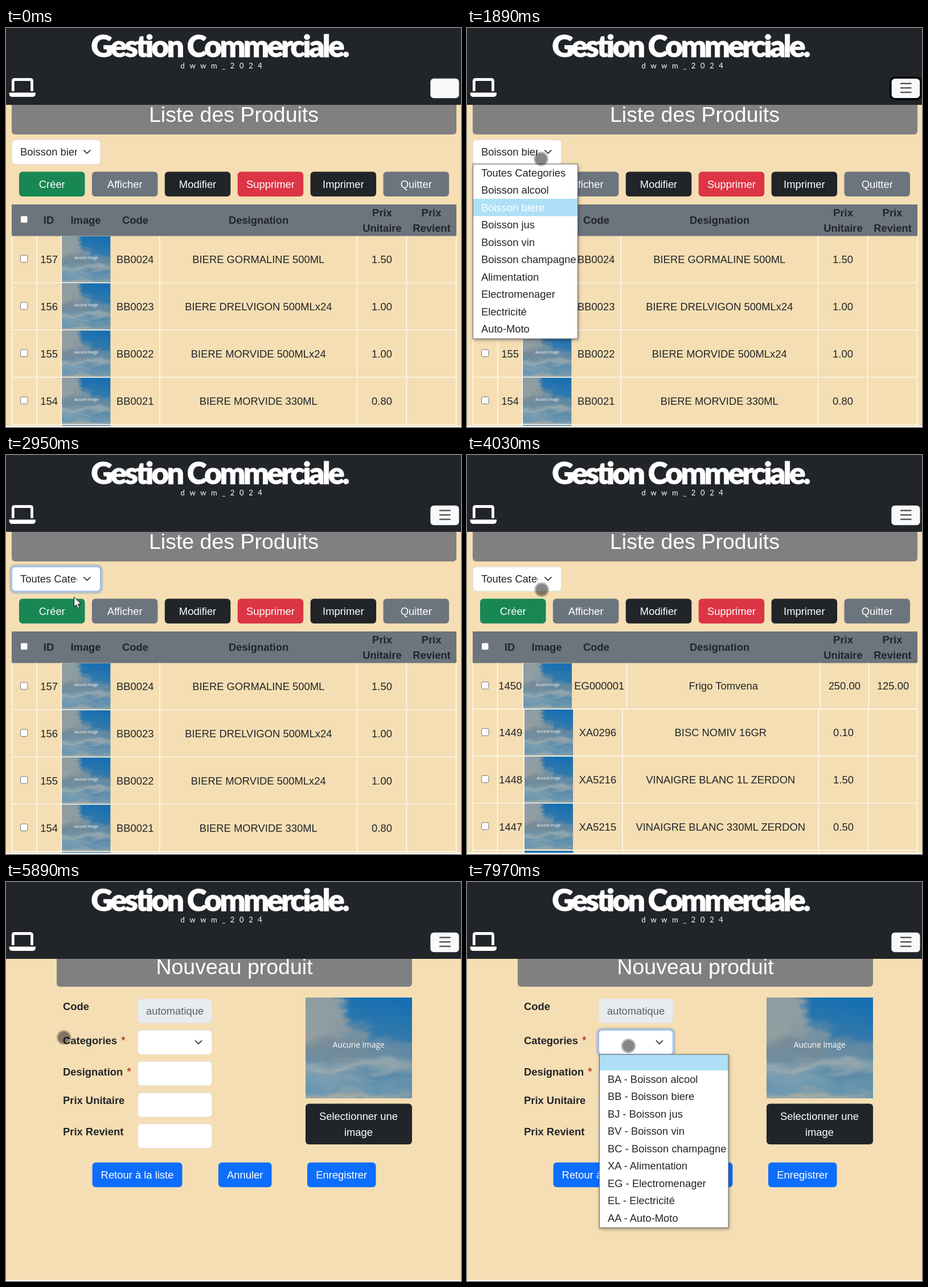
These frames come from a looping animation (799x701 px, 8 s). An HTML page:

```html
<!DOCTYPE html>
<html lang="fr">
<head>
<meta charset="utf-8">
<title>Gestion Commerciale</title>
<style>
  html, body { margin: 0; width: 100%; height: 100%; overflow: hidden; background: #fff; }
  svg { display: block; width: 100vw; height: 100vh; }
  text { font: 18.4px "Liberation Sans", Arial, sans-serif; fill: #212529; white-space: pre; }
  .mid { text-anchor: middle; }
  .bold { font-weight: 700; }
  .white { fill: #fff; }
  .title { font-size: 37.5px; fill: #fff; }
  .brand { font: 900 53px Lato, "Open Sans", sans-serif; letter-spacing: -3.65px; fill: #fff; stroke: #fff; stroke-width: .8; }
  .sub { font: 13px Lato, sans-serif; letter-spacing: 8.6px; fill: #fff; }
  .sky { font: 13.7px "Open Sans", "Noto Sans", sans-serif; fill: #fff; }
  .star { font-size: 20px; fill: #a31515; }
  .muted { fill: #5c6166; }
  .line { stroke: #fff; stroke-width: 1.2; }
  .menu { filter: drop-shadow(1px 2px 3px rgba(0,0,0,.4)); }
</style>
</head>
<body>
<svg id="stage" viewBox="0 0 799 701" preserveAspectRatio="none"></svg>
<script>
const LOOP = 8000;
const DARK = '#212529', GREY = '#6c757d', BLUE = '#0d6efd';

const rect = (x, y, w, h, fill, r = 0, extra = '') =>
  `<rect x="${x}" y="${y}" width="${w}" height="${h}" rx="${r}" fill="${fill}" ${extra}/>`;
const text = (x, y, s, cls = '') => `<text x="${x}" y="${y}" class="${cls}">${s}</text>`;
const hline = (x1, x2, y) => `<path class="line" d="M${x1} ${y}H${x2}"/>`;
const vline = (x, y1, y2) => `<path class="line" d="M${x} ${y1}V${y2}"/>`;
const blob = (x, y, rx, ry, fill, o = 1) =>
  `<ellipse cx="${x}" cy="${y}" rx="${rx}" ry="${ry}" fill="${fill}" opacity="${o}"/>`;
const sky = (x, y, w, h) =>
  `<use href="#sky" transform="translate(${x} ${y}) scale(${w / 188} ${h / 177})"/>`;
const button = (x, y, w, label, fill) =>
  rect(x, y, w, 43.4, fill, 6) + text(x + w / 2, y + 28.4, label, 'mid white');
const field = (x, y, w, fill = '#fff') =>
  rect(x, y, w, 42.4, fill, 6, 'stroke="#dee2e6"');
const chevron = (x, y) =>
  `<path d="M${x - 5.5} ${y - 2.7}l5.5 5.5l5.5 -5.5" fill="none" stroke="#343a40" stroke-width="1.9" stroke-linecap="round" stroke-linejoin="round"/>`;
const ring = (id, x, y, w) =>
  `<g id="${id}">${rect(x - 2.5, y - 2.5, w + 5, 47.4, 'none', 8, 'stroke="#0d6efd" stroke-opacity=".25" stroke-width="4.6"')}
   ${rect(x, y, w, 42.4, 'none', 6, 'stroke="#86b7fe"')}</g>`;
const checkbox = y => rect(25.5, y - 6, 12.5, 12.5, '#fff', 2.5, 'stroke="#767676"');

const defs = `<defs>
  <linearGradient id="air" x1=".65" y1="0" x2=".45" y2="1">
    <stop offset="0" stop-color="#176fb2"/><stop offset=".35" stop-color="#3279ab"/>
    <stop offset=".6" stop-color="#6790a8"/><stop offset="1" stop-color="#5f93b3"/>
  </linearGradient>
  <filter id="cloud" x="-30%" y="-30%" width="160%" height="160%">
    <feGaussianBlur stdDeviation="6" result="soft"/>
    <feTurbulence type="fractalNoise" baseFrequency=".018 .045" numOctaves="3" seed="4" result="noise"/>
    <feDisplacementMap in="soft" in2="noise" scale="34" xChannelSelector="R" yChannelSelector="G"/>
  </filter>
  <clipPath id="frame"><rect width="188" height="177"/></clipPath>
  <clipPath id="pick"><rect x="11" y="197" width="113.5" height="42"/></clipPath>
  <g id="sky" clip-path="url(#frame)">
    <rect width="188" height="177" fill="url(#air)"/>
    <g filter="url(#cloud)">
      ${blob(15, 40, 58, 58, '#a2a5a0', .85)}${blob(75, 62, 42, 22, '#8798a0', .75)}
      ${blob(40, 92, 75, 20, '#748a98', .85)}${blob(150, 92, 50, 14, '#6f8da1', .75)}
      ${blob(125, 118, 72, 9, '#a6afaf', .8)}${blob(25, 126, 55, 8, '#aeb5b2', .8)}
      ${blob(145, 138, 55, 6, '#4e86aa', .8)}${blob(50, 146, 60, 6, '#8ea6b2', .8)}
      ${blob(70, 172, 110, 9, '#b4b1a3', .85)}
    </g>
  </g>
</defs>`;

function row(top, bottom, cols, cells) {
  const [id, code, name, price, cost = ''] = cells;
  const [a, b, c, d, e] = cols;
  const mid = (top + bottom) / 2, base = mid + 6.8;
  const imgW = 85.5;
  return sky(b + .8, top + .8, imgW, bottom - top - 1.6)
    + `<text x="${b + 43.5}" y="${mid}" class="sky mid" style="font-size:6.3px">Aucune Image</text>`
    + checkbox(mid - 1)
    + text((a + b) / 2, base, id, 'mid') + text((b + imgW + c) / 2 + .3, base, code, 'mid')
    + text((c + d) / 2, base, name, 'mid') + text((d + e) / 2, base, price, 'mid')
    + text((e + 790.5) / 2, base, cost, 'mid')
    + [10.5, ...cols, 790.5].map(x => vline(x, top, bottom)).join('')
    + hline(10, 791, bottom);
}

function table(first, pitch, firstCols, cols, rows) {
  const last = first + 3 * pitch;
  return rows.map((r, i) =>
      row(i ? first + (i - 1) * pitch : 365, first + i * pitch, i ? cols : firstCols, r)).join('')
    + rect(cols[1] + .8, last + 1.2, 85.5, 699 - last, '#1f70ac')
    + [10.5, ...cols, 790.5].map(x => vline(x, last, 699)).join('');
}

const beerCols = [54, 97.3, 270, 616.5, 703.5];
const allCols = [53.5, 100, 273, 617.5, 704.5];
const beers = table(447.5, 83, beerCols, beerCols, [
  ['157', 'BB0024', 'BIERE GORMALINE 500ML', '1.50'],
  ['156', 'BB0023', 'BIERE DRELVIGON 500MLx24', '1.00'],
  ['155', 'BB0022', 'BIERE MORVIDE 500MLx24', '1.00'],
  ['154', 'BB0021', 'BIERE MORVIDE 330ML', '0.80']]);
const products = table(446.3, 82.6, [53.5, 98, 280.5, 620, 705.5], allCols, [
  ['1450', 'EG000001', 'Frigo Tomvena', '250.00', '125.00'],
  ['1449', 'XA0296', 'BISC NOMIV 16GR', '0.10'],
  ['1448', 'XA5216', 'VINAIGRE BLANC 1L ZERDON', '1.50'],
  ['1447', 'XA5215', 'VINAIGRE BLANC 330ML ZERDON', '0.50']]);

const heads = [[75, 344, 'ID'], [140, 344, 'Image'], [227, 344, 'Code'], [443.5, 344, 'Designation'],
  [660.5, 330.5, 'Prix'], [660.5, 358, 'Unitaire'], [747, 330.5, 'Prix'], [747.5, 358, 'Revient']];
const actions = [['Créer', '#198754'], ['Afficher', GREY], ['Modifier', DARK],
  ['Supprimer', '#dc3545'], ['Imprimer', DARK], ['Quitter', GREY]];

const listPage = `<g id="list">
  ${rect(10, 120, 781, 67, '#808080', 6)}${text(400, 164.5, 'Liste des Produits', 'mid title')}
  ${field(10.5, 196.7, 155)}
  <g clip-path="url(#pick)"><text id="choice" x="25" y="224"></text></g>
  ${chevron(142.3, 217.6)}${ring('ring1', 10.5, 196.7, 155)}
  ${actions.map(([s, c], i) => button(23 + i * 127.9, 252.6, 115.5, s, c)).join('')}
  ${rect(10, 310, 781, 55.5, GREY)}${checkbox(336)}
  ${heads.map(([x, y, s]) => text(x, y, s, 'mid bold')).join('')}
  <g id="beers">${beers}</g><g id="products">${products}</g>
</g>`;

const labels = [['Code', 225], ['Categories', 285], ['Designation', 339.5],
  ['Prix Unitaire', 390.3], ['Prix Revient', 445]];
const formPage = `<g id="form">
  ${rect(89, 120, 624, 64, '#808080', 6)}${text(401, 162, 'Nouveau produit', 'mid title')}
  ${labels.map(([s, y]) => text(100, y, s, 'bold')).join('')}
  ${text(202, 285, '*', 'star')}${text(212, 339.5, '*', 'star')}
  ${[205.3, 260.5, 315.3, 370.5, 425.1].map((y, i) => field(231.5, y, 130, i ? '#fff' : '#e9ecef')).join('')}
  ${text(246, 233, 'automatique', 'muted')}
  ${chevron(338, 281.6)}${ring('ring2', 231.5, 260.5, 130)}
  ${sky(526, 203, 187, 177)}${text(619.3, 290.5, 'Aucune Image', 'sky mid')}
  ${rect(526, 389.5, 187, 71.5, DARK, 6)}
  ${text(619, 418, 'Selectionner une', 'mid white')}${text(619, 445.7, 'image', 'mid white')}
  ${button(151.5, 492.8, 158, 'Retour à la liste', BLUE)}
  ${button(373, 492.8, 93.5, 'Annuler', BLUE)}
  ${button(529, 492.8, 120.5, 'Enregistrer', BLUE)}
</g>`;

const PITCH = 30.5;
function menu(id, x, y, w, h, top, items) {
  return `<g id="${id}"><g class="menu">${rect(x, y, w, h, '#fff')}</g>
    <rect class="hit" x="${x}" width="${w}" fill="#ade0f6"/>
    ${items.map((s, i) => text(x + 14.5, top + 21.8 + i * PITCH, s, 'item')).join('')}
    ${rect(x, y, w, h, 'none', 0, 'stroke="#60666c"')}</g>`;
}
const kinds = ['Boisson alcool', 'Boisson biere', 'Boisson jus', 'Boisson vin', 'Boisson champagne',
  'Alimentation', 'Electromenager', 'Electricité', 'Auto-Moto'];
const codes = ['BA', 'BB', 'BJ', 'BV', 'BC', 'XA', 'EG', 'EL', 'AA'];

const header = `${rect(0, 0, 799, 135, DARK)}
  ${text(374.5, 50.5, 'Gestion Commerciale.', 'brand mid')}${text(306.5, 70.5, 'dwwm_2024', 'sub')}
  <path d="M12.3 111V93.5q0 -3 3 -3H42.5q3 0 3 3V111" fill="none" stroke="#fff" stroke-width="4.8"/>
  <path d="M5.5 113.5H52v1.5q0 6 -6 6H11.5q-6 0 -6 -6z" fill="#fff"/>
  ${rect(745.3, 88.8, 50.2, 34.4, '#f8f9fa', 6)}
  <g id="burger">
    <path d="M762 97.5h17.5m-17.5 7.7h17.5m-17.5 7.7h17.5" stroke="#55595c" stroke-width="2.5" stroke-linecap="round"/>
  </g>
  ${rect(743.5, 87, 53.8, 38, 'none', 8, 'id="glow" stroke="#0b0c0e" stroke-width="4"')}`;

const cursor = `<g id="dot"><circle r="12.8" fill="#000" opacity=".28"/><circle r="10.3" fill="#000" opacity=".27"/></g>
  <path id="arrow" d="M119.5 249.5v17.2l3.9 -3.7l2.8 6.4l2.9 -1.3l-2.8 -6.2h5.3z" fill="#fff" stroke="#111" stroke-width="1"/>`;

document.getElementById('stage').innerHTML = defs + rect(0, 0, 799, 699, '#f5deb3')
  + listPage + formPage + rect(0, 699, 799, 2, '#fff') + header
  + menu('menu1', 10.5, 239, 184, 307, 239, ['Toutes Categories', ...kinds])
  + menu('menu2', 232.5, 303, 226.5, 304.5, 300.5, ['', ...kinds.map((s, i) => codes[i] + ' - ' + s)])
  + cursor;

// Pointer path: time, x, y
const path = [
  [710, 648, 716], [900, 440, 570], [1080, 210, 430], [1230, 60, 330], [1340, 50, 280], [1490, 126, 248],
  [1540, 130, 230], [2550, 130, 230], [2800, 119.5, 251], [3870, 119.5, 251],
  [4010, 134, 238], [4160, 114, 227], [4330, 92, 229], [4530, 92, 229],
  [4660, 88, 227], [4830, 82, 243], [5050, 99, 265], [5290, 101, 271], [5340, 101.7, 273], [6850, 101.7, 273],
  [6960, 84, 290], [7120, 150, 350], [7200, 190, 356], [7300, 229, 345], [7450, 266, 318], [7620, 283.5, 288]];

const $ = id => document.getElementById(id);
const show = (id, on) => { $(id).style.display = on ? '' : 'none'; };
const fade = (id, o) => { show(id, o > 0); $(id).style.opacity = o; };
const ramp = (t, a, b) => Math.min(1, Math.max(0, (t - a) / (b - a)));
const during = (t, a, b) => t >= a && t < b;

function pointAt(t) {
  const i = path.findIndex(p => p[0] > t);
  if (i < 0) return path[path.length - 1].slice(1);
  if (i === 0) return path[0].slice(1);
  const a = path[i - 1], b = path[i], k = ramp(t, a[0], b[0]);
  return [a[1] + (b[1] - a[1]) * k, a[2] + (b[2] - a[2]) * k];
}

function highlight(id, index, top, min) {
  const hit = document.querySelector(`#${id} .hit`);
  const y = Math.max(min, top + index * PITCH);
  hit.setAttribute('y', y);
  hit.setAttribute('height', top + (index + 1) * PITCH - y);
  document.querySelectorAll(`#${id} .item`).forEach((el, i) => { el.style.fill = i === index ? '#fff' : ''; });
}

function draw(t) {
  const form = t >= 5630, all = t >= 3230;
  show('list', !form);
  show('form', form);
  show('beers', !all);
  show('products', all);
  $('choice').textContent = t < 2950 ? 'Boisson biere' : 'Toutes Categories';

  show('burger', t >= 1540);
  fade('glow', t < 1540 ? 0 : 1 - ramp(t, 1900, 2040));
  fade('ring1', all ? 0 : ramp(t, 1900, 2040));
  fade('ring2', ramp(t, 7770, 7950));

  fade('menu1', t < 2950 ? ramp(t, 1540, 1740) : 0);
  highlight('menu1', t < 2650 ? 2 : 0, 239, 239);
  fade('menu2', ramp(t, 7700, 7870));
  highlight('menu2', 0, 300.5, 303);

  const arrow = during(t, 2950, 3230), [x, y] = pointAt(t);
  show('arrow', arrow);
  show('dot', t >= 710 && !arrow);
  $('dot').setAttribute('transform', `translate(${x} ${y})`);
}

const start = performance.now();
function tick() {
  draw((performance.now() - start) % LOOP);
  requestAnimationFrame(tick);
}
tick();
</script>
</body>
</html>
```
